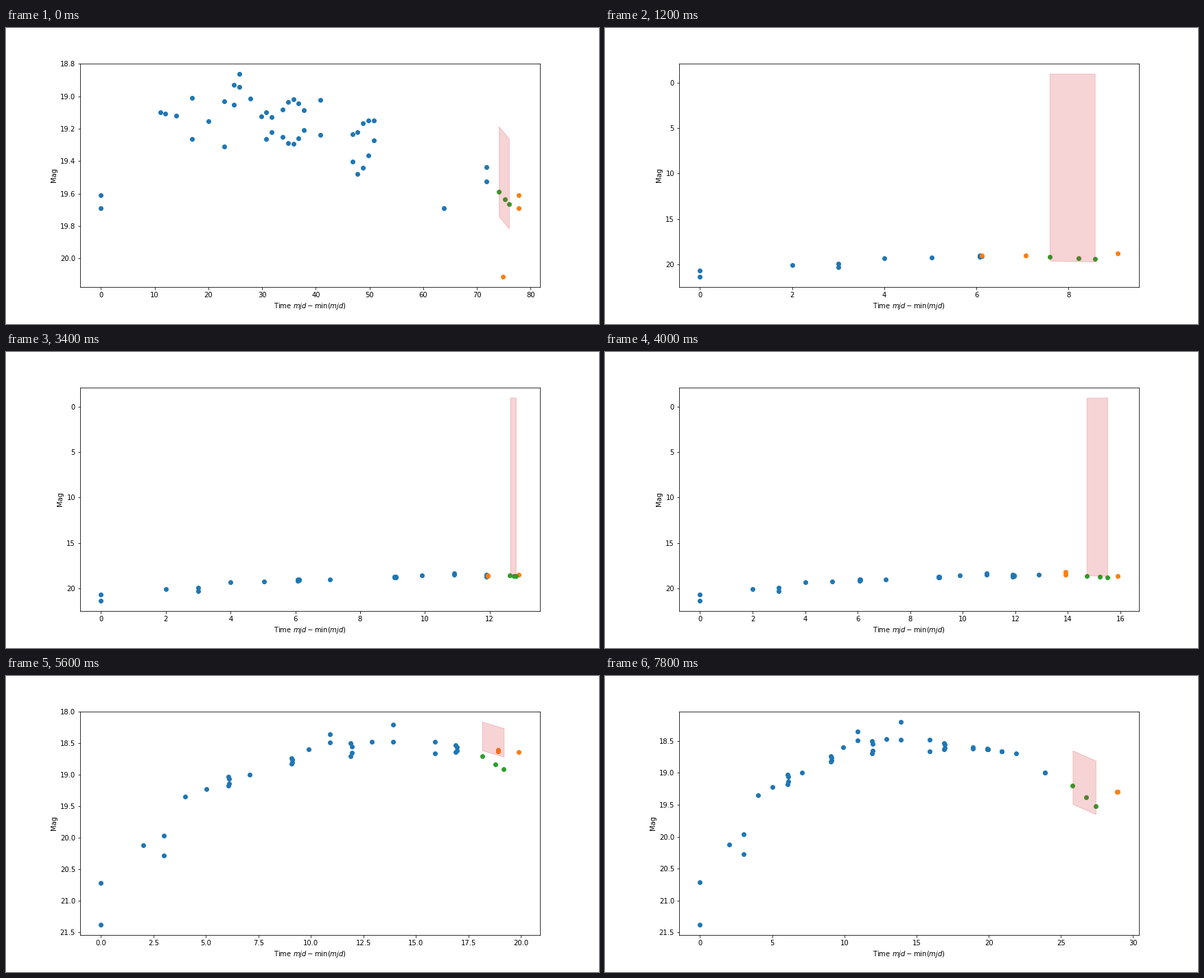
A matplotlib script for the animation above (8000 ms loop, 864 by 432 pixels).

```python
import numpy as np
import matplotlib.pyplot as plt
from matplotlib.animation import FuncAnimation

FRAMES = 40
HORIZON = 3       # observations held out for the forecast
FIRST_TRAIN = 5   # observations known when a curve starts
WIDE_UNTIL = 28   # the band is open towards bright values before this frame
OPEN_EDGE = -1.0


def survey(visits, trend, spread, drift):
    """Observe a brightness trend; repeat visits scatter around it."""
    pts = []
    for night, count in visits:
        for k in range(count):
            off = (-1) ** k * (1 - k // 2 / 2) * spread(night)
            t = night + np.interp(night, *zip(*drift)) + 0.04 * (k // 2)
            mag = np.interp(night, *zip(*trend))
            pts.append((t, mag + off if count > 1 else mag))
    return np.array(pts).T


def rising():
    counts = [2, 0, 1, 2, 1, 1, 4, 1, 0, 4, 1, 2, 4, 1, 2,
              0, 2, 4, 0, 2, 4, 2, 1, 0, 2, 0, 0, 0, 0, 3]
    trend = [(0, 21.045), (2, 20.12), (3, 20.12), (4, 19.35), (6, 19.1),
             (9, 18.78), (11, 18.42), (12, 18.6), (14, 18.34), (16, 18.57),
             (20, 18.63), (22, 18.7), (24, 19.0), (29, 19.3)]

    def spread(n):
        return 0.335 * np.exp(-n / 4) + 0.13 * np.exp(-((n - 14) / 3) ** 2)

    drift = [(4, 0), (6, 0.07), (9, 0.07), (10, -0.1)]
    return survey(enumerate(counts), trend, spread, drift)


def fading():
    once = [11, 12, 14, 20, 28, 30, 64, 75]
    twice = [0, 17, 23, 25, 26, 31, 32, *range(34, 39), 41,
             *range(47, 52), 72, 78]
    visits = sorted([(n, 1) for n in once] + [(n, 2) for n in twice])
    trend = [(0, 19.65), (11, 19.1), (23, 19.17), (26, 18.9), (31, 19.18),
             (41, 19.13), (48, 19.35), (51, 19.21), (64, 19.69),
             (72, 19.48), (75, 20.113), (78, 19.65)]

    def spread(n):
        return 0.04 + 0.1 * np.sin(n * np.pi / 6.5) ** 2

    return survey(visits, trend, spread, [(23, 0), (25, -0.2)])


RISING, FADING = rising(), fading()


def forecast(data, n, gap, ratio, lift, slope, edge, tilt, height):
    """Times closing in on the last observation, magnitudes and band."""
    start, end = data[0, n - 1], data[0, n + HORIZON - 1]
    level = data[1, n - HORIZON:n].mean()
    times = end - (end - start) * gap * ratio ** np.arange(HORIZON)
    days = times - times[0]
    faint = level + edge + tilt * days
    if height is None:
        bright = np.full(HORIZON, OPEN_EDGE)
    else:
        bright = faint - height
    return times, level + lift + slope * days, bright, faint


def scene(i):
    """Observations, number known and forecast for one frame."""
    if i == 0:
        n = FADING.shape[1] - HORIZON
        return FADING, n, forecast(FADING, n, gap=0.62, ratio=0.7, lift=0.04,
                                   slope=0.04, edge=0.19, tilt=0.04,
                                   height=0.555)
    n = FIRST_TRAIN + i - 1
    closed = np.interp(i, [32, 39], [0.455, 0.84])
    return RISING, n, forecast(
        RISING, n,
        gap=np.interp(i, [11, 17, 24, 32], [0.5, 0.27, 0.56, 0.62]),
        ratio=np.interp(i, [24, 32], [0.58, 0.7]),
        lift=np.interp(i, [24, 39], [0.08, 0.3]),
        slope=0.2,
        edge=np.interp(i, [6, 11, 17, 32, 39], [0.5, 0.17, 0, 0.06, 0.59]),
        tilt=0.1,
        height=None if i < WIDE_UNTIL else closed)


plt.rcParams.update({"font.family": "DejaVu Sans", "font.size": 10})
fig, ax = plt.subplots(figsize=(12, 6), dpi=72)
fig.subplots_adjust(left=0.125, right=0.9, bottom=0.125, top=0.88)


def draw(i):
    data, n, (times, mags, bright, faint) = scene(i)
    ax.clear()
    ax.scatter(*data[:, :n], color="C0")
    ax.scatter(*data[:, n:n + HORIZON], color="C1")
    ax.scatter(times, mags, color="C2")
    ax.fill_between(times, bright, faint, color="C3", alpha=0.2)
    ax.invert_yaxis()
    ax.set_xlabel(r"Time $mjd - \min(mjd)$")
    ax.set_ylabel("Mag")
    return []


anim = FuncAnimation(fig, draw, frames=FRAMES, interval=200, repeat=True,
                     init_func=lambda: draw(0))
plt.show()
```
